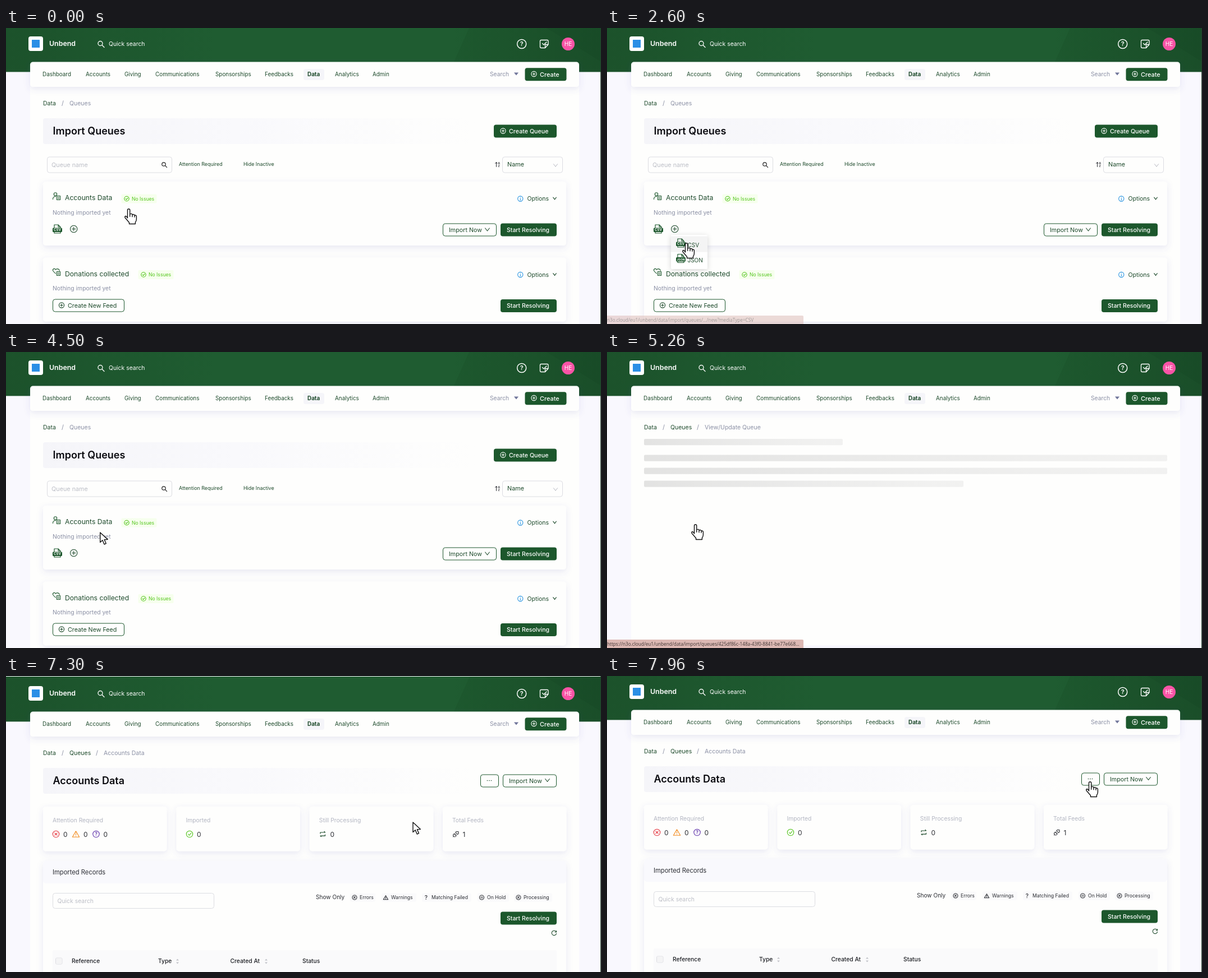
Recreate the animation shown at these times as an HTML page. Size 1060 by 528 pixels, loop 8 s.

```html
<!DOCTYPE html>
<html lang="en">
<head>
<meta charset="utf-8">
<title>Import queues</title>
<style>
html, body { margin: 0; width: 100%; height: 100%; overflow: hidden; background: #f9f8fe; }
svg { display: block; width: 1060px; height: 528px; font-family: Inter, sans-serif; }
text { white-space: pre; }
</style>
</head>
<body>
<svg id="stage" viewBox="0 0 1060 528"></svg>
<script>
const GREEN = '#1c572c', INK = '#1d4a2b', GREY = '#8b90a5', PALE = '#b3b6c2', DARK = '#2b2d33';

// Drawing helpers; text is placed by its left edge and the middle of its capitals.
const text = (x, cy, s, size = 10.5, fill = INK, weight = 400, extra = '') =>
  `<text x="${x}" y="${cy + size * .36}" font-size="${size}" fill="${fill}" font-weight="${weight}" ${extra}>${s}</text>`;
const rect = (x, y, w, h, fill, r = 0, extra = '') =>
  `<rect x="${x}" y="${y}" width="${w}" height="${h}" rx="${r}" fill="${fill}" ${extra}/>`;
const line = (d, color = INK, w = 1.1, fill = 'none') =>
  `<path d="${d}" fill="${fill}" stroke="${color}" stroke-width="${w}" stroke-linecap="round" stroke-linejoin="round"/>`;
const ring = (x, y, r, color = INK, w = 1.1, fill = 'none') =>
  `<circle cx="${x}" cy="${y}" r="${r}" fill="${fill}" stroke="${color}" stroke-width="${w}"/>`;
const frame = (x, y, w, h, color, r = 4) =>
  rect(x + .5, y + .5, w - 1, h - 1, '#fefefd', r, `stroke="${color}"`);
const card = (x, y, w, h) => rect(x, y, w, h, '#fefefd', 5, 'filter="url(#soft)"');
const plus = (x, y, r, color = INK) => ring(x, y, r, color) +
  line(`M${x - r / 2} ${y}h${r}M${x} ${y - r / 2}v${r}`, color);
const check = (x, y, r, color) => ring(x, y, r, color) +
  line(`M${x - r * .45} ${y}l${r * .35} ${r * .38} ${r * .6} ${-r * .7}`, color);
const cross = (x, y, r, color) => ring(x, y, r, color) +
  line(`M${x - r * .38} ${y - r * .38}l${r * .76} ${r * .76}m0 ${-r * .76}l${-r * .76} ${r * .76}`, color);
const chevron = (x, y, w, color = INK, lw = 1.1) => line(`M${x - w} ${y - w * .65}l${w} ${w * 1.3} ${w} ${-w * 1.3}`, color, lw);
const lens = (x, y, r, color, w) => ring(x, y, r, color, w) + line(`M${x + r * .75} ${y + r * .75}l${r} ${r}`, color, w);
const warning = (x, y, r, color) => line(`M${x} ${y - r}l${r * 1.1} ${r * 1.85}h${-r * 2.2}zM${x} ${y - r * .25}v${r * .4}M${x} ${y + r * .5}v.1`, color);
const button = (x, y, w, label, tx, size = 10.5) =>
  rect(x, y, w, 23, GREEN, 4) + text(tx, y + 11.3, label, size, '#fff', 500);
const mark = (x, y, size, color, weight = 500) => text(x, y, '?', size, color, weight, 'text-anchor="middle"');
const file = (x, y, label) =>
  line(`M${x + 3} ${y + 6}v-5.5h7l4 4v2M${x + 10} ${y + 1}v3.5h4M${x + 3} ${y + 13}v2.5h11v-2.5`, GREEN, 1.2) +
  rect(x, y + 6, 17, 7.5, GREEN, 1.5) +
  text(x + 8.5, y + 9.8, label, label.length > 3 ? 5.2 : 6, '#fff', 700, 'text-anchor="middle"');
const crumbs = (...items) => items.map(([x, s], i) => {
  const last = i === items.length - 1;
  return text(x, 134.5, s, 10.5, last ? GREY : INK) + (last ? '' : text(items[i + 1][0] - 14, 134.5, '/', 11, GREY));
}).join('');
const band = title => rect(66, 161, 770, 46, 'url(#band)', 4) + text(83.5, 184, title, 18, '#0b0b10', 600);

const nav = [[65, 'Dashboard'], [142, 'Accounts'], [211, 'Giving'], [266, 'Communications'], [373, 'Sponsorships'],
  [461, 'Feedbacks'], [537, 'Data'], [586, 'Analytics'], [653, 'Admin']];

const shell =
  rect(43, 70, 978, 460, '#fefefd') +
  rect(0, -2, 1060, 80.4, 'url(#head)') +
  '<path d="M826-2L790 78.400H1060V-2z" fill="#0b3018" opacity=".08"/><path d="M960-2L1060 60V-2z" fill="#0b3018" opacity=".08"/>' +
  rect(40, 15, 26, 26, '#fff', 4) + rect(46, 21, 14, 14, '#2b8fe6') +
  text(77, 28, 'Unbend', 12.4, '#fff', 600) +
  lens(168, 27.5, 4, '#fff', 1.3) + text(183, 28, 'Quick search', 10.4, '#fff') +
  ring(918.7, 28.5, 8, '#fff', 1.5) + mark(918.7, 28.5, 11, '#fff', 600) +
  line('M966 29v-5.500q0-2-2-2h-10.500q-2 0-2 2v10q0 2 2 2h7l5.500-6h-5.500v6M955.500 27.500l2.500 2.500 5-5', '#fff', 1.3) +
  `<circle cx="1001.500" cy="28.500" r="11.500" fill="#f954a6"/>` +
  text(1001.5, 28.7, 'HE', 10, '#fff', 400, 'text-anchor="middle"') +
  rect(43, 60.5, 978, 44.5, '#fefefd', 5, 'filter="url(#soft)"') +
  rect(530, 73, 37, 20, '#f5f5f9', 4) +
  nav.map(([x, s]) => text(x, 82.7, s, 9.9, INK, s === 'Data' ? 700 : 400)).join('') +
  text(862, 82.3, 'Search', 10.3, GREY) + '<path d="M905 79.500h8l-4 5z" fill="#70759a"/>' +
  button(924.5, 71.3, 74, 'Create', 951, 10.9) + plus(940.5, 82, 4.6, '#fff');

const heads = y => card(66, y, 932, 114) +
  `<g transform="translate(0 ${y - 274})">` + ring(916.3, 304.5, 4.6, '#2492e0') +
  line('M916.300 304v3M916.300 302v.1', '#2492e0') +
  text(928.5, 304.5, 'Options', 10.5) + chevron(977.5, 304, 2.8) +
  text(83, 329, 'Nothing imported yet', 10.4, GREY) + button(881, 348.5, 100, 'Start Resolving', 892) + '</g>';
const issues = (x, y) => rect(x, y - 8, 63, 16, '#f6ffed', 2) + check(x + 9.5, y, 4.2, '#52c41a') +
  text(x + 18.5, y, 'No Issues', 8.6, '#52c41a');
const sheet = (x, y) => line(`M${x} ${y}h6v7h-6zM${x + 1.700} ${y + 2.500}h2.600M${x + 1.700} ${y + 4.700}h2.600`, GREEN);

const list =
  crumbs([66, 'Data'], [113, 'Queues']) + band('Import Queues') +
  button(869, 172.5, 112, 'Create Queue', 896, 10.7) + plus(885.5, 183.5, 4.6, '#fff') +
  frame(73, 229.5, 223, 29, '#dcdde2') + text(81, 244, 'Queue name', 10.8, '#bdbfc7') + lens(281, 243, 3.2, '#222', 1.2) +
  text(308, 243, 'Attention Required', 8.9) + text(423, 243, 'Hide Inactive', 8.9) +
  line('M873.500 247.500v-8l-1.800 2m1.800-2l1.800 2', DARK, 1) +
  text(876.5, 241, 'A', 5, DARK, 600) + text(876.5, 246, 'Z', 5, DARK, 600) +
  frame(884, 229.5, 108, 29, '#dcdde2') + text(893, 243.5, 'Name', 10.8) + chevron(979, 245, 3.5, '#b5b7bf', 1) +
  heads(274) + heads(409.5) +
  ring(88, 296.5, 2.7, GREEN) + line('M83.500 305.500q0-5 5-5', GREEN) + sheet(90.5, 299.5) +
  text(105, 303, 'Accounts Data', 12.2) + issues(205.5, 304.5) +
  file(83, 350.5, 'CSV') + plus(120.7, 358.5, 6.2) +
  frame(778, 348.5, 96, 23, GREEN) + text(789, 359.7, 'Import Now', 10.7) + chevron(857.5, 359.5, 3.8) +
  line('M88.500 438q-8-6-3.500-8.500 2.500-.5 3.500 1.700 1.500-2.300 4.500-1.200', GREEN) + line('M93 430q2.500 1 2 3', GREEN) + sheet(90.5, 434.5) +
  text(105, 438.5, 'Donations collected', 12.2) + issues(235.5, 440) +
  frame(83, 483.5, 128, 23, GREEN) + plus(99, 494.5, 4.6) + text(110, 495, 'Create New Feed', 10.7);

const loading =
  crumbs([66, 'Data'], [113, 'Queues'], [174, 'View/Update Queue']) + rect(0, 523.5, 1060, 5, '#f7f6fd') +
  [[155, 354], [183.5, 932], [206.5, 932], [229.5, 569]].map(([y, w]) => rect(66, y, w, 11.3, 'url(#shimmer)', 2)).join('');

const stat = (x, label) => card(x, 230, 220.5, 79.5) + text(x + 17, 254.5, label, 10.3, PALE);
const sorter = x => `<path d="M${x} 504.500l2.500-3 2.500 3zM${x} 507.500l2.500 3 2.500-3z" fill="#c2c3c9"/>`;
const chip = (x, w, tx, label) => rect(x, 384.5, w, 15, '#fafafb', 2) + text(tx, 392, label, 8.7, DARK);
const plug = (x, y) => `<g transform="translate(${x} ${y}) rotate(-45)">` +
  line('M-1.500-2.700h-1.200a2.700 2.700 0 0 0 0 5.400h1.200zM2-2.700h1a2.700 2.700 0 0 1 0 5.400h-1zM-1.500-1.300h1.600M-1.500 1.300h1.600M-5.400 0h-1.300M5.700 0h1.300', DARK, 1) + '</g>';
const detail =
  crumbs([66, 'Data'], [113, 'Queues'], [174, 'Accounts Data']) + band('Accounts Data') +
  frame(845, 172.5, 33, 23, GREEN) + [857.5, 861, 864.5].map(x => `<circle cx="${x}" cy="183.500" r=".8" fill="${INK}"/>`).join('') +
  frame(885, 172.5, 96, 23, GREEN) + text(896, 183.7, 'Import Now', 10.7) + chevron(964.5, 183, 3.8) +
  stat(66, 'Attention Required') + stat(303.5, 'Imported') + stat(540.8, 'Still Processing') + stat(778, 'Total Feeds') +
  cross(89, 279, 5.7, '#e5333d') + warning(124.5, 279.5, 5.6, '#f28a1c') +
  ring(160.5, 279, 5.7, '#5a2ca8') + mark(160.5, 279, 8.5, '#5a2ca8', 600) + check(327, 279, 5.7, '#52c41a') +
  line('M560 278v-2h8.500l-1.500-1.500M568.500 280v2.200h-8.500l1.500 1.500', INK, 1.2) +
  plug(801.3, 279.2) +
  [[102, 0], [138, 0], [173.5, 0], [340, 0], [577.5, 0], [813.5, 1]].map(([x, n]) => text(x, 279.3, n, 12, DARK)).join('') +
  card(66, 327, 932, 230) + rect(66, 327, 932, 40, '#f9f9fd', 5) +
  text(83, 347, 'Imported Records', 11.2, DARK) +
  frame(83, 384, 288, 28, '#dcdde2') + text(91.5, 398, 'Quick search', 10.4, '#bdbfc7') +
  text(552, 391.5, 'Show Only', 10.1, DARK) +
  chip(613, 45, 630, 'Errors') + cross(621, 392, 4, DARK) +
  chip(669, 62, 686, 'Warnings') + warning(676.5, 392.5, 3.8, DARK) +
  chip(741, 88, 758, 'Matching Failed') + mark(748.5, 392, 10, DARK) +
  chip(840, 56, 857, 'On Hold') + ring(847.5, 392, 4, DARK) + line('M846.300 390.500v3M848.700 390.500v3', DARK, 1) +
  chip(905, 68, 922, 'Processing') + cross(913, 392, 4, DARK) +
  button(881, 417.5, 100, 'Start Resolving', 892) +
  line('M979.500 452.500a4.200 4.200 0 1 0 1 4M980.500 451.500v2.500h-2.500', INK, 1.1) +
  rect(83, 486, 898, 44, '#fafafb', 3) + frame(88, 499.5, 12.5, 12, '#dcdde2', 2) + rect(89, 500.5, 10.500, 10, '#f4f4f5', 1) +
  [[117, 'Reference'], [271, 'Type'], [399.5, 'Created At'], [528, 'Status']].map(([x, s]) => text(x, 505.5, s, 10.3, '#1d1f24', 500)).join('') +
  sorter(303) + sorter(461);

const menu =
  rect(114, 369, 65, 61, '#fff', 3, 'filter="url(#lift)"') + rect(114, 371.5, 65, 28, '#f4f4f4', 0, 'id="hover"') +
  file(123, 375.5, 'CSV') + text(143.5, 387, 'CSV', 10) + file(123, 403, 'JSON') + text(143.5, 414.5, 'JSON', 10);
const tip = rect(73, 317, 96, 24, '#434343', 2, 'filter="url(#lift)"') + '<path d="M117.500 340.500h7l-3.500 3.500z" fill="#434343"/>' +
  text(79, 328.7, 'Create New Feed', 10.2, '#fff');
const status = rect(-4, 513, 354, 18, '#dcb8b3', 2) +
  '<text id="url" x="0" y="523.500" font-size="8.200" fill="#413634" font-family="Open Sans, Noto Sans, sans-serif"></text>';

const stop = (o, c, a = 1) => `<stop offset="${o}" stop-color="${c}" stop-opacity="${a}"/>`;
const shadow = (id, dy, blur, color, a) => `<filter id="${id}" x="-40%" y="-40%" width="180%" height="180%">
  <feDropShadow dx="0" dy="${dy}" stdDeviation="${blur}" flood-color="${color}" flood-opacity="${a}"/></filter>`;
const group = (id, body) => `<g id="${id}">${body}</g>`;

const stage = document.getElementById('stage');
stage.innerHTML = `<defs>
  <linearGradient id="head">${stop(0, '#1c522b') + stop(.35, '#1f5c31') + stop(.75, '#1f5c31') + stop(1, '#1c512b')}</linearGradient>
  <linearGradient id="band">${stop(0, '#f5f5f9') + stop(.45, '#f9f9fc') + stop(1, '#fefefd')}</linearGradient>
  <linearGradient id="shimmer">${stop(.25, '#bebebe', .2) + stop(.37, '#818181', .24) + stop(.63, '#bebebe', .2)}</linearGradient>
  ${shadow('soft', 4, 6, '#5058b0', .13) + shadow('lift', 2, 5, '#000', .16)}</defs>` +
  group('page', shell + group('list', list) + group('loading', loading) + group('detail', detail)) +
  rect(1059, 0, 1, 528, '#24402d') +
  group('menu', menu) + group('tip', tip) + group('status', status) +
  group('arrow', line('M1 1V18.500L5.200 14.800 8.300 22 11.500 20.600 8.400 13.700 14.500 13.400z', '#111', 1.4, '#fff')) +
  group('hand', line('M5.500 17V2.800a2.100 2.100 0 0 1 4.200 0V9.800q4-1.300 4.300 1.200 3.600-1.400 4 1.200 3.400-.8 3.400 2.200V19q0 3-2 5.500V27.500H8.500V25L1.200 16.500q-1.200-2.400 1-3 1.500.2 3.300 3.500zM9.700 9.800v4.500M14 11v3.800M18 12.200v3', '#111', 1.4, '#fff'));

const el = Object.fromEntries([...stage.querySelectorAll('[id]')].map(e => [e.id, e]));
const ramp = (t, a, b) => Math.min(1, Math.max(0, (t - a) / (b - a)));
const show = (e, on) => { e.style.display = on ? '' : 'none'; };
const within = (t, a, b) => t >= a && t < b;

// Pointer path: time, x, y of the tip.
const path = [[0, 217, 322], [30, 217, 322], [330, 176, 376], [540, 138, 397], [830, 121, 360], [900, 119, 358],
  [2230, 119, 358], [2600, 140, 383], [3030, 150, 386], [3060, 150, 386], [3480, 180, 377], [3860, 199, 366],
  [4130, 199, 366], [4730, 151, 299], [5160, 151, 299], [5260, 156, 307], [5960, 330, 400],
  [6430, 330, 400], [7000, 724, 260], [7300, 724, 260], [7900, 859, 188], [8000, 859, 188]];

function slope(i, k) {
  const a = path[i - 1], b = path[i], c = path[i + 1];
  if (!a || !c || (c[k] - b[k]) * (b[k] - a[k]) <= 0) return 0;
  return (c[k] - a[k]) / (c[0] - a[0]);
}

function along(t, k) {
  const i = path.findIndex(p => p[0] > t) - 1, a = path[i], b = path[i + 1];
  const d = b[0] - a[0], u = (t - a[0]) / d, s = u * u * (3 - 2 * u);
  return a[k] + (b[k] - a[k]) * s + d * u * (1 - u) * ((1 - u) * slope(i, k) - u * slope(i + 1, k));
}

function draw(t) {
  show(el.list, t < 4930);
  show(el.loading, within(t, 4930, 6160));
  show(el.detail, t >= 6160);

  const drop = t >= 7300 ? 3 * (1 - ramp(t, 7310, 7610)) ** 2 : 0;
  el.page.setAttribute('transform', `translate(0 ${drop})`);

  const sweep = 1 - (1 - ramp(Math.min(5960, Math.max(5160, t)), 4930, 6330)) ** 2.3;
  el.shimmer.setAttribute('x1', -3 * (1 - sweep));
  el.shimmer.setAttribute('x2', 4 - 3 * (1 - sweep));

  const open = (1 - (1 - ramp(t, 1645, 1860)) ** 5) * (1 - ramp(t, 3720, 3880) ** 2);
  show(el.menu, open > 0);
  el.menu.setAttribute('opacity', open);
  el.menu.setAttribute('transform', `translate(0 369) scale(1 ${.8 + .2 * open}) translate(0 -369)`);
  show(el.hover, within(t, 2500, 3460));

  const hint = ramp(t, 840, 930) * (1 - ramp(t, 2260, 2400)), zoom = .8 + .2 * hint;
  el.tip.setAttribute('opacity', hint);
  el.tip.setAttribute('transform', `translate(121 344) scale(${zoom}) translate(-121 -344)`);

  const base = 'n3o.cloud/eu1/unbend/data/import/queues/';
  el.url.textContent = t < 4000 ? base + '.../new?mediaType=CSV' : 'https://' + base + '425df86c-148a-43f0-8841-be77e668...';
  el.status.setAttribute('opacity', t < 4000
    ? ramp(t, 2530, 2670) * (1 - ramp(t, 3720, 3860))
    : ramp(t, 4620, 4730) * (1 - ramp(t, 5360, 5560)));

  const x = along(t, 1), y = along(t, 2);
  const hand = t < 100 || within(t, 760, 3460) || within(t, 4600, 5360) || t >= 7780;
  show(el.hand, hand);
  show(el.arrow, !hand);
  el.hand.setAttribute('transform', `translate(${x - 6} ${y})`);
  el.arrow.setAttribute('transform', `translate(${x} ${y})`);
}

let start;
function tick(now) {
  start ??= now;
  draw(Math.max(0, now - start) % 8000);
  requestAnimationFrame(tick);
}
draw(0);
requestAnimationFrame(tick);
</script>
</body>
</html>
```
